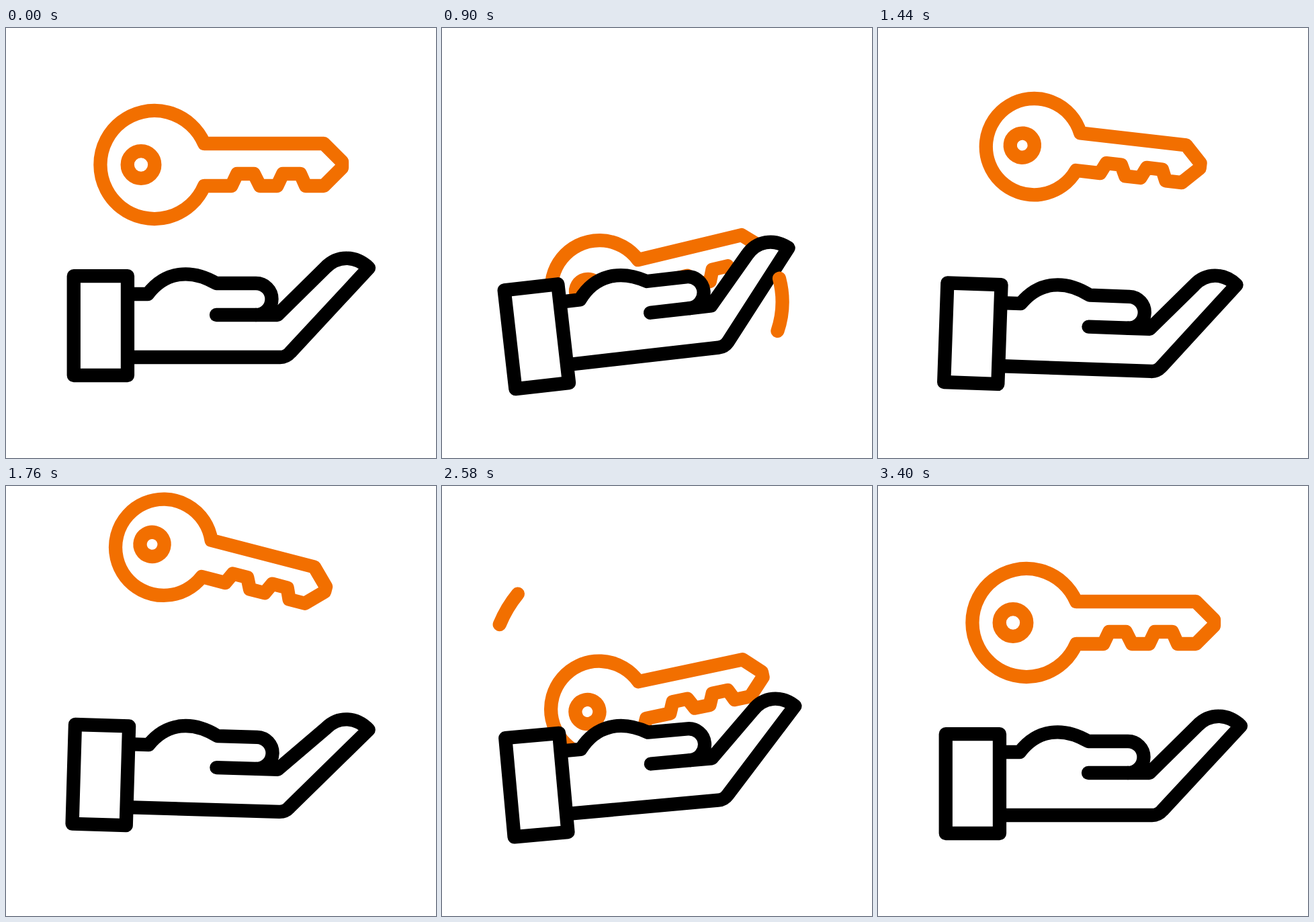
These frames come from a looping animation (640x640 px, 3.58 s). An HTML page:

```html
<!DOCTYPE html>
<html lang="en">
<head>
<meta charset="utf-8">
<title>Hand tossing a key</title>
<style>
  html, body { margin: 0; width: 100%; height: 100%; overflow: hidden; background: #fff; }
  svg { display: block; width: 100%; height: 100%; }
  g, .swoosh { stroke-width: 20.3; stroke-linecap: round; stroke-linejoin: round; }
  #key, .swoosh { fill: none; stroke: #f26f00; }
  #hand { fill: #fff; stroke: #000; }
</style>
</head>
<body>
<svg viewBox="0 0 640 640">
  <g id="key">
    <path d="M295 172A80.5 80.5 0 1 0 295 235H335.500L344 217H369L378 235H403.500L412 217H438L446 235H473L500 208V199L473 172Z"/>
    <circle cx="201" cy="203.500" r="20.300"/>
  </g>
  <g id="hand">
    <path id="palm"/>
    <path d="M313 427H372"/>
    <rect x="100.750" y="369.200" width="80.200" height="147.800"/>
  </g>
  <path class="swoosh" id="low"/>
  <path class="swoosh" id="high"/>
</svg>
<script>
const LOOP = 3580, RAD = Math.PI / 180;
const el = id => document.getElementById(id);
const key = el('key'), hand = el('hand'), palm = el('palm'), low = el('low'), high = el('high');

// Progress from 0 to 1 between two times: eased at both ends, or only at the end.
const part = (t, a, b) => Math.min(1, Math.max(0, (t - a) / (b - a)));
const ease = (t, a, b) => {
  const u = part(t, a, b);
  return u * u * (3 - 2 * u);
};
const easeOut = (t, a, b) => Math.sin(part(t, a, b) * Math.PI / 2);

// An arc whose head runs ahead counter-clockwise and whose tail follows.
function swoosh(node, t, start, cx, cy, r, from, to) {
  const head = from + (to - from) * ease(t, start, start + 350);
  const tail = from + (to - from) * ease(t, start + 340, start + 770);
  const at = a => `${cx + r * Math.cos(a * RAD)} ${cy + r * Math.sin(a * RAD)}`;
  node.setAttribute('d', tail - head > 0.1 ? `M${at(tail)}A${r} ${r} 0 0 0 ${at(head)}` : '');
}

// The fingertips turn about the knuckle and shorten; the rest of the palm is rigid.
function palmPath(bend, length) {
  const c = Math.cos(bend * RAD) * length, s = Math.sin(bend * RAD) * length;
  const kx = 408, ky = 482;
  const tip = (x, y) => `${kx + (x - kx) * c - (y - ky) * s} ${ky + (x - kx) * s + (y - ky) * c}`;
  return 'M181 396H211C237 362 275 358 313 380H372A23.5 23.5 0 0 1 372 427H404'
    + `L${tip(475, 357)}C${tip(493, 338)} ${tip(520, 338)} ${tip(540, 357)}`
    + 'L423 483Q417 490 408 490H181';
}

function drawKey(t, small) {
  const drop = ease(t, 200, 1040), toss = easeOut(t, 1070, 1790);
  const fall = ease(t, 1800, 2790), lift = ease(t, 2905, 3220), settle = ease(t, 3220, 3400);
  const y = 203.5 + 176.5 * drop - 267 * toss + 227 * fall - 152 * lift + 15.5 * settle;
  const turn = -14.6 * drop + 29.2 * toss - 26.6 * ease(t, 1800, 2580) + 12 * ease(t, 2675, 3400);
  const size = 1 - 0.11 * small;
  key.setAttribute('transform',
    `translate(320.300 ${y}) rotate(${turn}) scale(${size}) translate(-320.300 -203.500)`);
  key.style.strokeWidth = 20.3 / size;
}

function drawHand(t, small) {
  const y = -8 * ease(t, 200, 540) + 37 * ease(t, 540, 1140) - 42.5 * ease(t, 1160, 1800)
    - 3 * ease(t, 1800, 2280) + 29.5 * ease(t, 2300, 2780)
    - 16 * ease(t, 2780, 3200) + 3 * ease(t, 3200, 3400);
  const turn = -8 * ease(t, 200, 720) + 3 * ease(t, 720, 1080) + 8 * ease(t, 1160, 1520)
    - 9 * ease(t, 1560, 2400) + 6 * ease(t, 2440, 3050);
  const bend = -3.3 * ease(t, 200, 900) + 5.6 * ease(t, 1200, 2000)
    - 4.3 * ease(t, 2300, 2780) + 2 * ease(t, 2780, 3400);
  hand.setAttribute('transform', `translate(0 ${y}) rotate(${turn} 141 443)`);
  palm.setAttribute('d', palmPath(bend, 1 - 0.036 * small));
}

function draw(t) {
  const small = ease(t, 200, 720) - ease(t, 2940, 3400);
  drawKey(t, small);
  drawHand(t, small);
  swoosh(low, t, 280, 369.5, 407.5, 137, 105, -14.7);
  swoosh(high, t, 1960, 249.6, 273, 177, -95.7, -157.8);
}

const start = performance.now();
function tick() {
  draw((performance.now() - start) % LOOP);
  requestAnimationFrame(tick);
}
tick();
</script>
</body>
</html>
```
